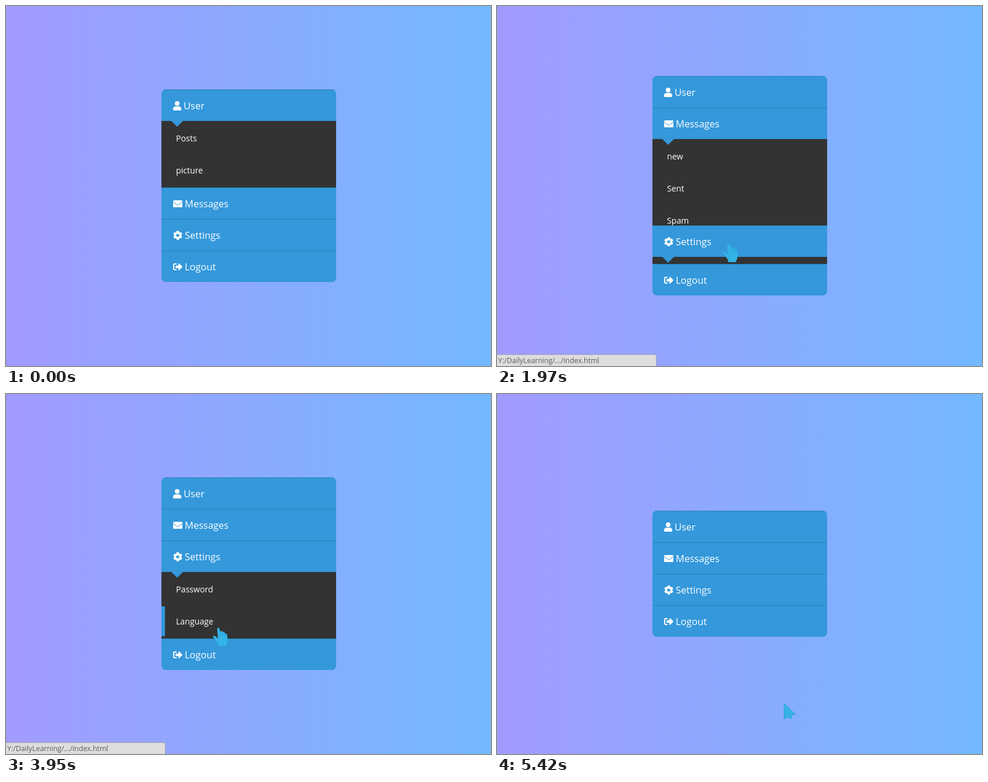
An HTML page for the animation above (5.48 s loop, 833x617 px).

```html
<!DOCTYPE html>
<html lang="en">
<head>
<meta charset="utf-8">
<title>Accordion menu</title>
<style>
  html, body { margin: 0; width: 100%; height: 100%; overflow: hidden; }
  body {
    position: relative;
    background: linear-gradient(to right, #a29bfe, #74b9ff);
    font-family: "Open Sans", "Noto Sans", sans-serif;
    color: #fff;
  }
  #menu {
    position: absolute; left: 267px; width: 300px;
    border-radius: 8px; overflow: hidden;
    background: #3498db;
  }
  .header {
    box-sizing: border-box; height: 54px; padding-left: 20px;
    display: flex; align-items: center; gap: 4px;
    border-top: 1px solid #2980b9;
    background: #3498db;
    font-size: 16.5px; line-height: 53px;
  }
  .closing .header { border-color: #3693d3; }
  .header svg { display: block; fill: #fff; }
  .panel { position: relative; overflow: hidden; background: #333; }
  .panel::before {
    content: ""; position: absolute; left: 17px; top: 0;
    border: 10px solid transparent; border-top-color: #3498db; border-bottom: 0;
  }
  .item {
    position: relative; height: 51px; margin-top: 4px; padding-left: 25px;
    font-size: 14.2px; line-height: 51px;
  }
  .bar { position: absolute; left: 0; top: 0; width: 6px; height: 51px; background: #3498db; }
  #status {
    position: absolute; left: 0; top: 597px; width: 274px; height: 20px;
    box-sizing: border-box; padding-left: 2px;
    border: solid #a3a3ae; border-width: 1px 1px 0 0; border-top-right-radius: 3px;
    background: #ddd; color: #5c5c5c;
    font-size: 12.35px; line-height: 20px; white-space: nowrap;
  }
  #cursor { position: absolute; left: 0; top: 0; overflow: visible; fill: #33b3e6; }
</style>
</head>
<body>
<div id="menu"></div>
<div id="status">Y:/DailyLearning/.../index.html</div>
<svg id="cursor" width="26" height="32">
  <path id="arrow" stroke="#2b96d4" stroke-width=".6"
    d="M0 0L20 19.3 12 20.3 14 25 10 27 7.5 22.5 0 28z"/>
  <g id="hand" transform="translate(-8 0)">
    <path d="M7.3 2Q9-.9 11 1.5L12.5 8V6.3q2-.9 3.6.6l.7 2V7.6q2-.7 3.3 1l.6 2.4v-1q2.2-.2 3.6 2L25.4 22q0 3-2 6.500L22.500 32H9.500L8.500 28 .3 16q-.3-1.700 1.200-2Q4 14 6.500 17l2 2z"/>
    <path d="M12.600 8l.8 6M16.800 9l.7 5.500M20.700 11l.5 4" fill="none" stroke="#2b94cd" stroke-width=".8"/>
  </g>
</svg>
<script>
const LOOP = 5480, CENTER = 308, HEADER = 54, OPEN_HEIGHT = 160, SLIDE = 500, FADE = 200;

const tooth = angle => `<rect x="5.700" y=".3" width="4.600" height="15.400" rx="1" transform="rotate(${angle} 8 8)"/>`;

// open and close are click times; hover holds [enter, leave] times for each item
const sections = [
  { label: "User", iconWidth: 14, open: -SLIDE, close: 920,
    icon: `<circle cx="7" cy="4" r="4"/>
      <path d="M0 14.500v-1.300A4.200 4.200 0 0 1 4.200 9h5.600A4.200 4.200 0 0 1 14 13.200v1.300a1.500 1.500 0 0 1-1.500 1.500h-11A1.500 1.500 0 0 1 0 14.500z"/>`,
    items: [{ label: "Posts", hover: [] }, { label: "picture", hover: [] }] },
  { label: "Messages", iconWidth: 16, open: 920, close: 1928,
    icon: `<rect y="2" width="16" height="12" rx="1.500"/>
      <path d="M0 4.800L6.500 9.600Q8 10.700 9.500 9.600L16 4.800" fill="none" stroke="#3498db"/>`,
    items: [
      { label: "new", hover: [[1050, 1130]] },
      { label: "Sent", hover: [[1130, 1290]] },
      { label: "Spam", hover: [[1290, 1580]] }] },
  { label: "Settings", iconWidth: 16, open: 1928, close: 4370,
    icon: `${[0, 60, 120].map(tooth).join("")}<circle cx="8" cy="8" r="5.900"/><circle cx="8" cy="8" r="2.600" fill="#3498db"/>`,
    items: [
      { label: "Password", hover: [[2340, 3200]] },
      { label: "Language", hover: [[2130, 2290], [3200, 4050]] }] },
  { label: "Logout", iconWidth: 16, items: [],
    icon: `<path d="M6 3H3Q1 3 1 5v6q0 2 2 2h3" fill="none" stroke="#fff" stroke-width="2"/>
      <path d="M15.800 8.500l-5.300 5.300c-.5.500-1.300.1-1.300-.5v-3H5c-.4 0-.8-.3-.8-.8v-3c0-.4.3-.8.8-.8h4.200v-3c0-.7.8-1 1.300-.5l5.300 5.300q.3.500 0 1z"/>` }
];

// cursor tip: time, x, y
const track = [
  [110, 739, 600], [230, 640, 520], [350, 545, 450], [450, 490, 388], [540, 461, 353],
  [640, 461, 353], [730, 454, 342], [1000, 450, 336], [1200, 450, 336],
  [1450, 424, 372], [1720, 397, 405], [1780, 396, 407], [2130, 396, 407],
  [2400, 372, 340], [2540, 366.5, 332], [3040, 366.5, 332], [3100, 366.5, 333],
  [3400, 366, 380], [3830, 366, 380], [4250, 357, 450], [4750, 357, 450],
  [4990, 362, 506], [5050, 364, 512], [5170, 364, 512], [5300, 430, 531], [5420, 493, 530]
];

const $ = id => document.getElementById(id);
const clamp = v => Math.max(0, Math.min(1, v));
const ramp = (t, start, length) => clamp((t - start) / length);

// CSS "ease": cubic-bezier(.25, .1, .25, 1)
function ease(x) {
  const bezier = (s, a, b) => 3 * s * (1 - s) ** 2 * a + 3 * s * s * (1 - s) * b + s ** 3;
  let low = 0, high = 1;
  for (let i = 0; i < 20; i++) {
    const mid = (low + high) / 2;
    if (bezier(mid, .25, .25) < x) low = mid; else high = mid;
  }
  return bezier(low, .1, 1);
}

function add(parent, className, html = "") {
  const element = document.createElement("div");
  element.className = className;
  element.innerHTML = html;
  return parent.appendChild(element);
}

for (const section of sections) {
  const { icon, iconWidth, label, items } = section;
  add($("menu"), "header", `<svg width="${iconWidth}" height="16">${icon}</svg><span>${label}</span>`);
  if (!items.length) continue;
  section.panel = add($("menu"), "panel");
  for (const item of items) {
    item.bar = add(add(section.panel, "item", item.label), "bar");
  }
}

function panelHeight({ items, open, close }, t) {
  const full = items.length * 55 + 4;
  const limit = OPEN_HEIGHT * (ease(ramp(t, open, SLIDE)) - ease(ramp(t, close, SLIDE)));
  return Math.min(full, Math.round(limit));
}

const hoverLevel = (hover, t) => Math.max(0, ...hover.map(([enter, leave]) =>
  ramp(Math.min(t, leave), enter, FADE) - ramp(t, leave, FADE)));

function cursorAt(t) {
  const next = track.findIndex(point => point[0] > t);
  if (next < 0) return track[track.length - 1].slice(1);
  if (next === 0) return null;
  const [t0, x0, y0] = track[next - 1], [t1, x1, y1] = track[next];
  const k = (t - t0) / (t1 - t0);
  return [x0 + (x1 - x0) * k, y0 + (y1 - y0) * k];
}

function draw(t) {
  let height = HEADER * sections.length;
  for (const section of sections) {
    if (!section.panel) continue;
    const open = panelHeight(section, t);
    height += open;
    section.panel.style.height = open + "px";
    for (const { bar, hover } of section.items) bar.style.opacity = hoverLevel(hover, t);
  }
  const top = Math.floor(CENTER - height / 2);
  $("menu").style.top = top + "px";
  $("menu").classList.toggle("closing", t >= 4480 && t < 4870);
  $("status").style.opacity = ramp(t, 600, 185) - ramp(t, 4850, 195);

  const tip = cursorAt(t);
  $("cursor").style.display = tip ? "block" : "none";
  if (!tip) return;
  const [x, y] = tip;
  const onMenu = x >= 267 && x < 567 && y >= top && y < top + height;
  $("cursor").style.transform = `translate(${x}px, ${y}px)`;
  $("hand").style.display = onMenu ? "inline" : "none";
  $("arrow").style.display = onMenu ? "none" : "inline";
}

const start = performance.now();
function frame() {
  draw((performance.now() - start) % LOOP);
  requestAnimationFrame(frame);
}
frame();
</script>
</body>
</html>
```
